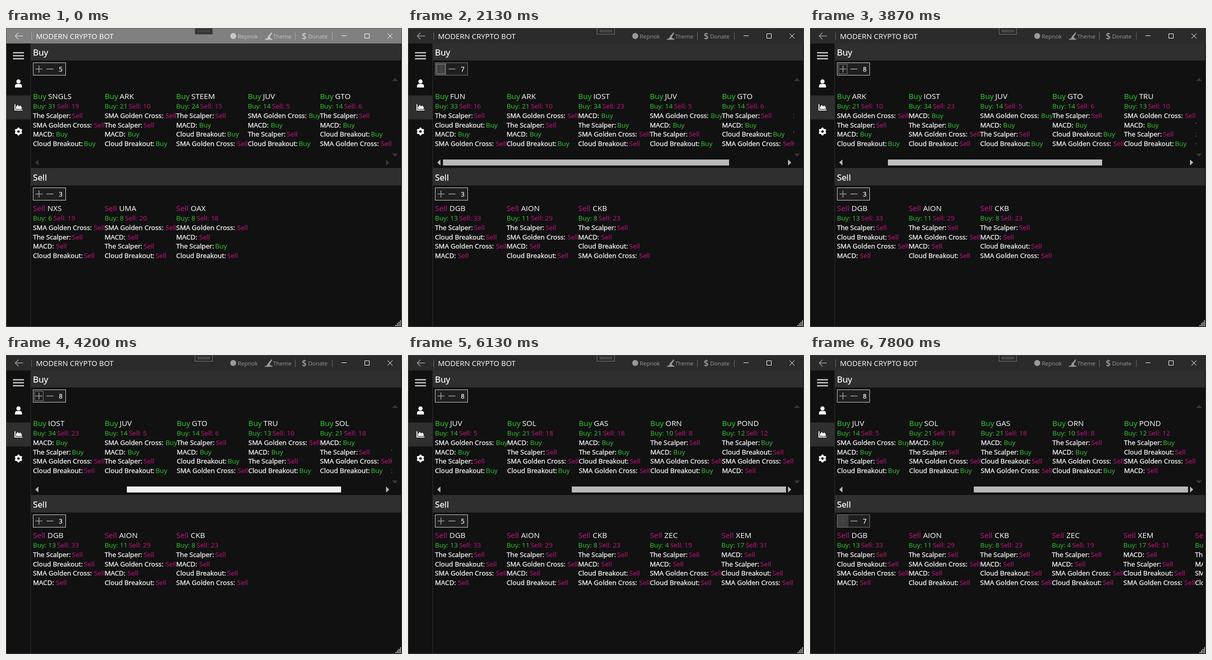
Animation, 793 px wide and 598 px high, one loop 8000 ms. Source, as an HTML page:

```html
<!DOCTYPE html>
<html lang="en">
<head>
<meta charset="utf-8">
<title>Modern Crypto Bot</title>
<style>
  html, body { margin: 0; width: 100%; height: 100%; overflow: hidden; background: #111; }
  svg { display: block; width: 793px; height: 598px; }
  text { font-family: "Open Sans", "Noto Sans", sans-serif; fill: #fff; white-space: pre; }
  .row { font-size: 13.37px; }
  .head { font-size: 15.28px; }
  .section { font-size: 17.2px; }
  .label, .section, .num { stroke: #fff; stroke-width: .3px; }
  .num { font-size: 12.4px; text-anchor: middle; }
  .menu { font-size: 11.4px; fill: inherit; }
  .buy { fill: #32cd32; }
  .sell { fill: #c71585; }
</style>
</head>
<body>
<svg viewBox="0 0 793 598" xmlns="http://www.w3.org/2000/svg">
  <defs>
    <clipPath id="buyClip"><rect x="54" y="120" width="719" height="135"/></clipPath>
    <clipPath id="sellClip"><rect x="54" y="346" width="733" height="130"/></clipPath>
  </defs>
  <rect width="793" height="598" fill="#111"/>
  <rect id="bar" width="793" height="31"/>
  <path d="M50 31H791V65H50ZM50 280H791V315H50ZM1 135H49V183H1ZM49 31H50V597H49Z" fill="#2f2f2f"/>

  <g id="menu" stroke="none">
    <path d="M18.5 16H34M25 9.5L18.5 16L25 22.5" fill="none" stroke-width="1.5" class="ink"/>
    <path d="M51.5 9V24M579.5 9V24M653.5 9V24" fill="none" class="ink" opacity=".6"/>
    <circle cx="455" cy="16" r="6"/>
    <path d="M531.5 8.5L533 10L528 18.5L531 21.5H533.5V23.5H518.5V21.5H521Q524 20 524.5 17Q525 15 527 14Z"/>
    <text class="menu" x="464" y="21">Repnok</text>
    <text class="menu" x="535" y="21">Theme</text>
    <text class="menu" x="605" y="21">Donate</text>
    <text x="592" y="23" style="font-size:18px;font-weight:600;fill:inherit">$</text>
  </g>
  <text x="60" y="22" font-size="14.75">MODERN CRYPTO BOT</text>
  <path d="M672 15.5H682M718.5 11.5H727.5V20.5H718.5ZM764 11L774 21M774 11L764 21" fill="none" stroke="#fff"/>
  <g id="handle">
    <rect x="378.5" y="-1" width="35" height="13.5"/>
    <path d="M384.5 4.5H407.5V7.5H384.5Z" fill="none"/>
  </g>

  <path d="M14 49.5H36M14 55.5H36M14 61.5H36" stroke="#ccc" stroke-width="2.6"/>
  <g fill="#fff">
    <circle cx="25" cy="107" r="4.2"/>
    <path d="M18 119V117Q18 112 22 112H28Q32 112 32 117V119Z"/>
    <path d="M17 152.500H18.800V163.200H33V165H17ZM20 162V158L23.500 153.800L26 157L28.500 155L31.500 158.500V162Z"/>
    <path id="gear" fill-rule="evenodd"/>
  </g>

  <text class="section" x="54" y="55">Buy</text>
  <text class="section" x="54" y="305">Sell</text>
  <path d="M773 106L779 100L785 106ZM773 251L779 257L785 251Z" fill="#383838"/>
  <path id="arrows" d="M65 263V275L58.5 269ZM761 263V275L767.5 269Z"/>
  <g id="thumb"></g>
  <g id="buyBox"></g>
  <g id="sellBox"></g>
  <g id="buyList" clip-path="url(#buyClip)"></g>
  <g id="sellList" clip-path="url(#sellClip)"></g>
  <path id="grip" fill="#ddd"/>
  <rect id="frame" x=".5" y=".5" width="792" height="597" fill="none"/>
</svg>
<script>
const LOOP = 8000;
const $ = id => document.getElementById(id);

// Signals: T scalper, G golden cross, M macd, C cloud; + buys, - sells
const SIGNALS = {
  T: ['The Scalper:', 78], G: ['SMA Golden Cross:', 122],
  M: ['MACD:', 46], C: ['Cloud Breakout:', 102]
};
const COINS = {};
`SNGLS 31 19 T- G- M+ C+
ARK 21 10 G- T- M+ C+
STEEM 24 15 T- M+ C+ G-
JUV 14 5 G+ M+ T- C+
GTO 14 6 T- M+ C+ G-
FUN 33 16 T- C+ M+ G-
IOST 34 23 M+ T+ G- C-
TRU 13 10 G- M+ T- C+
SOL 21 18 M+ T- G- C+
GAS 21 18 M+ T+ C- G-
ORN 10 8 T- M+ G- C+
POND 12 12 T+ C- G- M-
NXS 6 19 G- T- M- C-
UMA 8 20 G- M- T- C-
OAX 8 18 G- M- T+ C-
DGB 13 33 T- C- G- M-
AION 11 29 T- G- M- C-
CKB 8 23 T- M- C- G-
ZEC 4 19 T- M- G- C-
XEM 17 31 M- T- C- G-
VET 9 21 T- M- G- C-`.split('\n').forEach(line => {
  const [name, buys, sells, ...signals] = line.split(' ');
  COINS[name] = { name, buys, sells, signals };
});

const BUY_START = 'SNGLS ARK STEEM JUV GTO';
const BUY_MID = 'FUN ARK IOST JUV GTO TRU SOL GAS';
const BUY_END = 'FUN ARK IOST JUV SOL GAS ORN POND';
const SELL_START = 'NXS UMA OAX';
const SELL_END = 'DGB AION CKB ZEC XEM VET';

// Each track is a list of [time, value] steps
const TRACKS = {
  active: [[0, 0], [1330, 1]],
  buyNames: [[0, BUY_START], [2070, BUY_MID], [5800, BUY_END]],
  buyCols: [[0, 5], [2070, 6], [2470, 7], [2870, 8]],
  buyCount: [[0, 5], [1800, 6], [2000, 7], [2400, 8]],
  buyDim: [[0, 0], [870, 1], [2530, 0]],
  buyHover: [[0, ''], [930, '+'], [2530, '']],
  focus: [[0, 0], [1400, 1], [5600, 0]],
  scroll: [[0, 0], [3530, 1], [4200, 2], [4470, 3]],
  thumb: [[0, '#b8b8b8'], [3070, '#d8d8d8'], [3400, '#f0f0f0'], [3670, '#d8d8d8'], [3730, '#c8c8c8'],
    [3870, '#c0c0c0'], [3930, '#d8d8d8'], [4000, '#f0f0f0'], [4600, '#b8b8b8']],
  sellNames: [[0, SELL_START], [2070, SELL_END]],
  sellCols: [[0, 3], [6070, 4], [6130, 5], [7800, 6]],
  sellCount: [[0, 3], [5670, 4], [5870, 5], [7470, 6], [7670, 7]],
  sellDim: [[0, 0], [5130, 1], [6070, 0], [6870, 1], [6930, 0], [7200, 1]],
  sellHover: [[0, ''], [5270, '-'], [5400, '+'], [6070, ''], [7400, '+']]
};

const stateAt = t => Object.fromEntries(Object.entries(TRACKS).map(
  ([key, steps]) => [key, steps.filter(s => s[0] <= t).pop()[1]]));

const text = (cls, x, y, s) => `<text class="${cls}" x="${x}" y="${Math.round(y)}">${s}</text>`;

function card(coin, side, x, y) {
  const isBuy = side === 'Buy';
  let out = text('head ' + side.toLowerCase(), x, y, side) +
    text('head', x + (isBuy ? 30.2 : 29), y, coin.name) +
    text('row buy', x, y + 19.2, 'Buy: ' + coin.buys) +
    text('row sell', x + 33.2 + 7.55 * coin.buys.length, y + 19.2, 'Sell: ' + coin.sells);
  coin.signals.forEach((sig, i) => {
    const [label, w] = SIGNALS[sig[0]];
    const word = sig[1] === '+' ? 'Buy' : 'Sell';
    const rowY = y + 38 + i * 18.65;
    out += text('row label', x, rowY, label) + text('row ' + word.toLowerCase(), x + w, rowY, word);
  });
  return out;
}

function list(names, cols, skip, side, y) {
  let x = 54;
  return names.split(' ').slice(skip, cols).map(name => {
    const coin = COINS[name], out = card(coin, side, x, y);
    x += coin.signals.includes('G+') ? 144.5 : 143.4;
    return out;
  }).join('');
}

function box(y, count, dim, hover, focus) {
  const ink = sign => hover === sign ? '#4a4a4a' : '#999';
  const hx = hover === '-' ? 77 : 55;
  return `<rect x="54.5" y="${y + .5}" width="65" height="25" fill="#1f1f1f" stroke="${dim ? '#777' : '#d0d0d0'}"/>` +
    (hover ? `<rect x="${hx}" y="${y + 1}" width="22" height="24" fill="#3e3e3e"/>` : '') +
    `<path d="M59 ${y + 13}H73M66 ${y + 6}V${y + 20}" stroke="${ink('+')}" stroke-width="1.6"/>` +
    `<path d="M81 ${y + 13}H95" stroke="${ink('-')}" stroke-width="1.6"/>` +
    (focus ? `<rect x="57.5" y="${y + 3.5}" width="17" height="19" fill="none" stroke="#ddd" stroke-dasharray="1 1"/>` : '') +
    text('num', 109.6, y + 18, count);
}

function paint(s) {
  const ink = s.active ? '#999' : '#c8c8c8';
  $('bar').setAttribute('fill', s.active ? '#2b2b2b' : '#808080');
  $('menu').setAttribute('fill', ink);
  document.querySelectorAll('.ink').forEach(p => p.setAttribute('stroke', ink));
  $('handle').setAttribute('fill', s.active ? '#2b2b2b' : '#333');
  $('handle').setAttribute('stroke', s.active ? '#777' : '#555');
  $('frame').setAttribute('stroke', s.active ? '#444' : '#5b5b5b');

  const scrolls = s.buyCols > 5, unit = 687 / s.buyCols;
  $('arrows').setAttribute('fill', scrolls ? '#b8b8b8' : '#383838');
  $('thumb').innerHTML = scrolls
    ? `<rect x="${Math.round(70 + s.scroll * unit)}" y="263" width="${Math.round(5 * unit)}" height="12" fill="${s.thumb}"/>` : '';
  $('buyBox').innerHTML = box(69, s.buyCount, s.buyDim, s.buyHover, s.focus);
  $('sellBox').innerHTML = box(319, s.sellCount, s.sellDim, s.sellHover, 0);
  $('buyList').innerHTML = list(s.buyNames, s.buyCols, s.scroll, 'Buy', 142);
  $('sellList').innerHTML = list(s.sellNames, s.sellCols, 0, 'Sell', 366);
}

function gearPath() {
  const points = [];
  for (let i = 0; i < 24; i++) {
    const a = (i - .5) * Math.PI / 12, r = i % 4 < 2 ? 8 : 6.3;
    points.push((25 + r * Math.sin(a)).toFixed(2) + ' ' + (207 - r * Math.cos(a)).toFixed(2));
  }
  return `M${points.join('L')}ZM22.5 207a2.5 2.5 0 1 0 5 0a2.5 2.5 0 1 0 -5 0Z`;
}

function gripPath() {
  let d = '';
  for (let row = 0; row < 4; row++)
    for (let col = 0; col <= row; col++) d += `M${789 - 3 * col} ${585 + 3 * row}h2v2h-2Z`;
  return d;
}

$('gear').setAttribute('d', gearPath());
$('grip').setAttribute('d', gripPath());

const start = performance.now();
let last = '';
function tick() {
  const state = stateAt((performance.now() - start) % LOOP);
  const key = JSON.stringify(state);
  if (key !== last) paint(state);
  last = key;
  requestAnimationFrame(tick);
}
tick();
</script>
</body>
</html>
```
